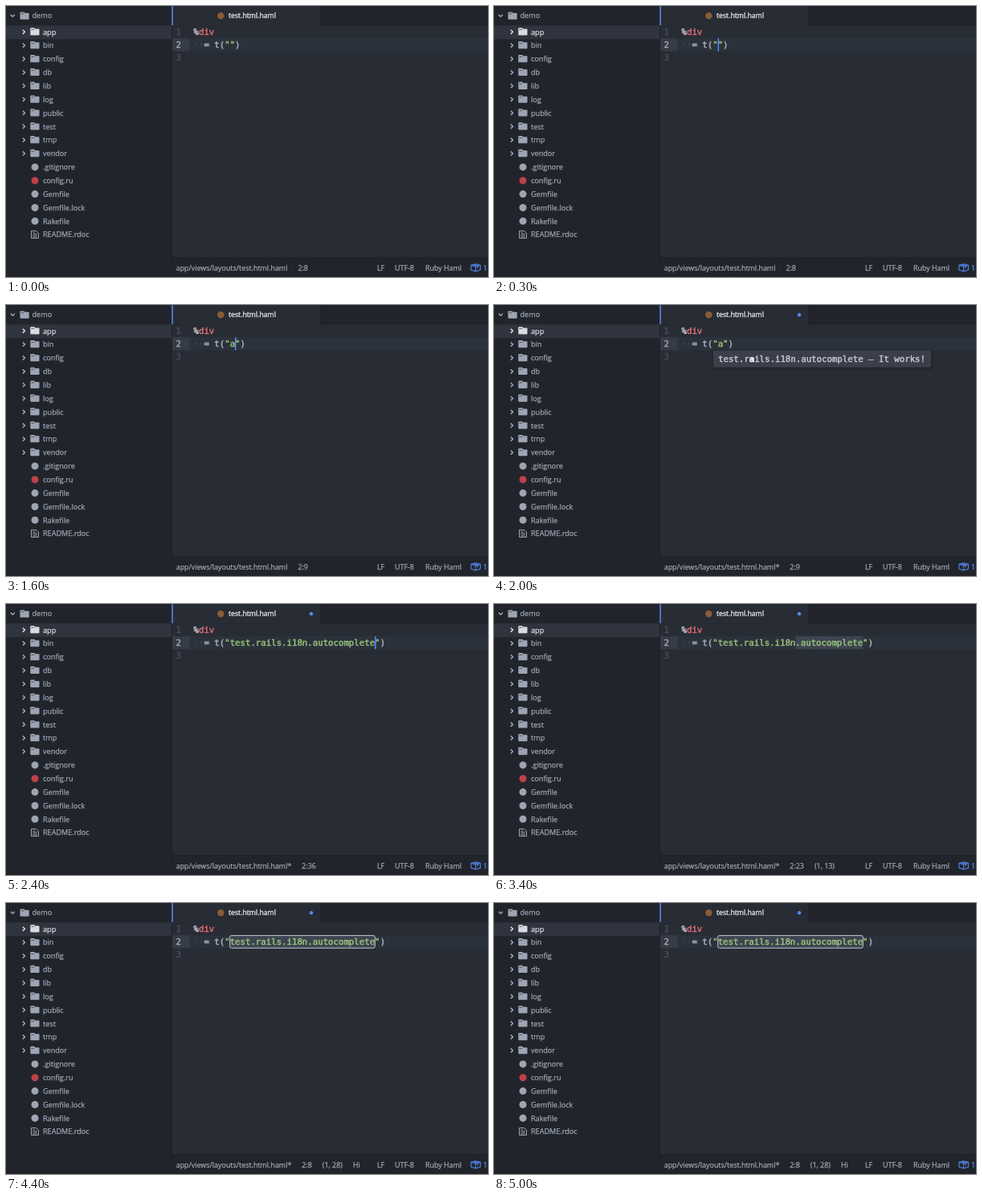
These frames come from a looping animation (600 by 338 pixels, 5.1 s). An HTML page with a canvas:

```html
<!DOCTYPE html>
<html lang="en">
<head>
<meta charset="utf-8">
<title>Editor autocomplete</title>
<style>
html, body { margin: 0; width: 100%; height: 100%; overflow: hidden; background: #21252b; }
canvas { display: block; width: 600px; height: 338px; }
</style>
</head>
<body>
<canvas id="stage"></canvas>
<script>
const canvas = document.getElementById('stage');
const ctx = canvas.getContext('2d');
const scale = window.devicePixelRatio || 1;
canvas.width = 600 * scale;
canvas.height = 338 * scale;

const LOOP = 5100, STEP = 100;
const SANS = '"Open Sans", "Noto Sans", sans-serif';
const UI = '8.92px ' + SANS, TREE = '9.1px ' + SANS, TAB = '8.7px ' + SANS;
const CODE = '10.71px "DejaVu Sans Mono", monospace';
const CHAR = 6.45, CODE_X = 233.5, LINE_TOP = 24, LINE_H = 16.2;
const KEY = 'test.rails.i18n.autocomplete';
const C = {
  side: '#21252b', editor: '#282c34', edge: '#1d2026', text: '#9da5b4', bright: '#d7dae0',
  code: '#abb2bf', green: '#98c379', red: '#e06c75', blue: '#568af2', select: '#3e4451'
};
const FOLDERS = ['app', 'bin', 'config', 'db', 'lib', 'log', 'public', 'test', 'tmp', 'vendor'];
const FILES = ['.gitignore', 'config.ru', 'Gemfile', 'Gemfile.lock', 'Rakefile', 'README.rdoc'];

const colX = col => CODE_X + col * CHAR;
const lineY = line => LINE_TOP + line * LINE_H;

function rect(x, y, w, h, color) {
  ctx.fillStyle = color;
  ctx.fillRect(x, y, w, h);
}

// A hairline stroke thickens the glyphs like smoothed screen text.
function write(text, x, y, color, font = UI, weight = 0.25) {
  ctx.font = font;
  ctx.fillStyle = ctx.strokeStyle = color;
  ctx.lineWidth = weight;
  ctx.lineJoin = 'round';
  ctx.fillText(text, x, y);
  ctx.strokeText(text, x, y);
  return x + ctx.measureText(text).width;
}

function code(text, col, line, color) {
  write(text, colX(col), lineY(line) + 11.5, color, CODE, 0.45);
}

function disc(x, y, r, color) {
  ctx.fillStyle = color;
  ctx.beginPath();
  ctx.arc(x, y, r, 0, 7);
  ctx.fill();
}

function path(points, color, width, close) {
  ctx.beginPath();
  points.forEach(([x, y]) => ctx.lineTo(x, y));
  if (close) ctx.closePath();
  ctx.strokeStyle = color;
  ctx.lineWidth = width;
  ctx.stroke();
}

function roundBox(x, y, w, h, r) {
  ctx.beginPath();
  ctx.roundRect(x, y, w, h, r);
}

function folder(x, y, color) {
  ctx.fillStyle = color;
  roundBox(x, y - 5, 5.6, 3, 0.8);
  ctx.fill();
  roundBox(x, y - 3.7, 11.2, 8, 0.8);
  ctx.fill();
  rect(x + 0.9, y - 2.9, 4, 0.6, C.side);
}

function page(x, y) {
  path([[x, y - 4.5], [x + 6, y - 4.5], [x + 9, y - 1.8], [x + 9, y + 4.5], [x, y + 4.5]], C.text, 1, true);
  for (let i = 0; i < 4; i++) rect(x + 1.8, y - 2.6 + i * 1.7, i ? 5.5 : 3, 0.8, C.text);
}

function sidebar() {
  rect(0, 0, 206, 338, C.side);
  path([[5.8, 10.8], [8.3, 13.3], [10.8, 10.8]], C.text, 1.5);
  folder(17.5, 12.4, C.text);
  write('demo', 32.5, 15.4, C.text, TREE);
  rect(0, 24.3, 206, 17, '#2f343e');

  const rowY = i => 32.6 + i * 16.85;
  FOLDERS.forEach((name, i) => {
    const y = rowY(i), color = i ? C.text : C.bright;
    path([[20.8, y - 2.9], [23.5, y - 0.3], [20.8, y + 2.3]], color, 1.5);
    folder(30.3, y - 0.4, color);
    write(name, 46, y + 3, color, TREE);
  });
  FILES.forEach((name, i) => {
    const y = rowY(i + FOLDERS.length);
    if (name === 'README.rdoc') page(31.5, y - 0.3);
    else disc(36, y - 0.2, 4.5, name === 'config.ru' ? '#be4149' : C.text);
    write(name, 46, y + 3, C.text, TREE);
  });
}

function tabs(modified) {
  rect(207, 0, 393, 24, C.side);
  rect(207, 23.4, 393, 0.8, C.edge);
  rect(207, 0, 184, 24.4, C.editor);
  rect(391, 0, 0.8, 24, C.edge);
  rect(206, 0, 0.8, 338, C.edge);
  rect(206.3, 0, 1.5, 24, C.blue);
  disc(267.3, 12.2, 4.2, '#8a5c36');
  write('test.html.haml', 277, 15, C.bright, TAB, 0.4);
  if (modified) disc(380, 12.3, 2.2, C.blue);
}

function statusBar(s) {
  rect(206.8, 313.5, 394, 25, C.side);
  rect(206.8, 313, 394, 0.8, C.edge);
  const items = ['app/views/layouts/test.html.haml' + (s.modified ? '*' : ''), '2:' + s.column];
  if (s.selected) items.push(`(1, ${s.selected})`);
  if (s.outlined) items.push('Hi');
  let x = 211.7;
  for (const item of items) x = write(item, x, 329.7, C.text) + 13;

  write('LF', 462, 329.7, C.text);
  write('UTF-8', 484, 329.7, C.text);
  write('Ruby Haml', 522, 329.7, C.text);
  path([[579, 323.3], [584.7, 321.8], [590.4, 323.3], [590.4, 329.2], [584.7, 331], [579, 329.2]], C.blue, 1.1, true);
  path([[579, 323.3], [584.7, 325], [590.4, 323.3]], C.blue, 1.1);
  path([[584.7, 325], [584.7, 331]], C.blue, 1.1);
  path([[582, 322.6], [587.4, 324.2], [587.4, 327]], C.blue, 1.1);
  write('1', 594, 329.7, C.blue);
}

function popup(match) {
  const y = lineY(2) + 0.4;
  ctx.save();
  ctx.shadowColor = 'rgba(0,0,0,.35)';
  ctx.shadowBlur = 4 * scale;
  ctx.shadowOffsetY = scale;
  ctx.fillStyle = '#3a3f4a';
  roundBox(273, y, 271, 21, 2);
  ctx.fill();
  ctx.restore();
  const label = KEY + ' – It works!';
  [...label].forEach((char, i) => {
    const hit = i === match;
    write(char, 279 + i * CHAR, y + 14, hit ? '#fff' : '#c3c8d1', (hit ? 'bold ' : '') + CODE, 0.45);
  });
}

function editor(s) {
  rect(206, 24, 394, 290, C.editor);
  rect(206.8, lineY(1), 22, LINE_H, '#363b46');
  rect(228.8, lineY(1), 372, LINE_H, '#2c323b');
  for (let i = 0; i < 3; i++) {
    write(String(i + 1), 211.5, lineY(i) + 11.5, i === 1 ? C.code : '#4b5263', CODE);
  }
  code('%', 0, 0, C.bright);
  code('div', 1, 0, C.red);

  const end = 7 + s.value.length;
  if (s.selected) rect(colX(end - s.selected), lineY(1), s.selected * CHAR, LINE_H, C.select);
  code('··', 0, 1, '#40464f');
  code('= t(', 2, 1, C.code);
  code(`"${s.value}"`, 6, 1, C.green);
  code(')', end + 1, 1, C.code);
  if (s.outlined) {
    roundBox(colX(7), lineY(1) + 0.4, KEY.length * CHAR, LINE_H - 0.6, 2);
    ctx.strokeStyle = '#c3c9d2';
    ctx.lineWidth = 1;
    ctx.stroke();
  }
  if (s.cursor) rect(colX(end) - 0.1, lineY(1), 1.5, LINE_H, '#528bff');
  if (s.match >= 0) popup(s.match);
}

// One tap, then key repeat extends the selection leftwards.
function selectedAt(t) {
  if (t < 2600) return 0;
  if (t < 2850) return 1;
  return Math.min(KEY.length, 2 + Math.floor((t - 2850) / 50));
}

function stateAt(t) {
  const edits = [[-200, ''], [600, 't'], [1200, ''], [1600, 'a'], [2200, KEY]];
  const [since, value] = edits.filter(([at]) => at <= t).pop();
  const selected = selectedAt(t);
  return {
    value, selected,
    column: 8 + value.length - selected,
    modified: t >= 900 && t < 1500 || t >= 1900,
    match: t >= 700 && t < 1200 ? 0 : t >= 1800 && t < 2200 ? KEY.indexOf('a') : -1,
    cursor: !selected && (since < 0 ? t >= 200 : (t - since) % 800 < 400),
    outlined: t >= 4300
  };
}

function draw(t) {
  const s = stateAt(t);
  ctx.setTransform(scale, 0, 0, scale, 0, 0);
  editor(s);
  sidebar();
  tabs(s.modified);
  statusBar(s);
}

const start = performance.now();
function tick() {
  const t = (performance.now() - start) % LOOP;
  draw(Math.floor(t / STEP) * STEP);
  requestAnimationFrame(tick);
}
tick();
</script>
</body>
</html>
```
